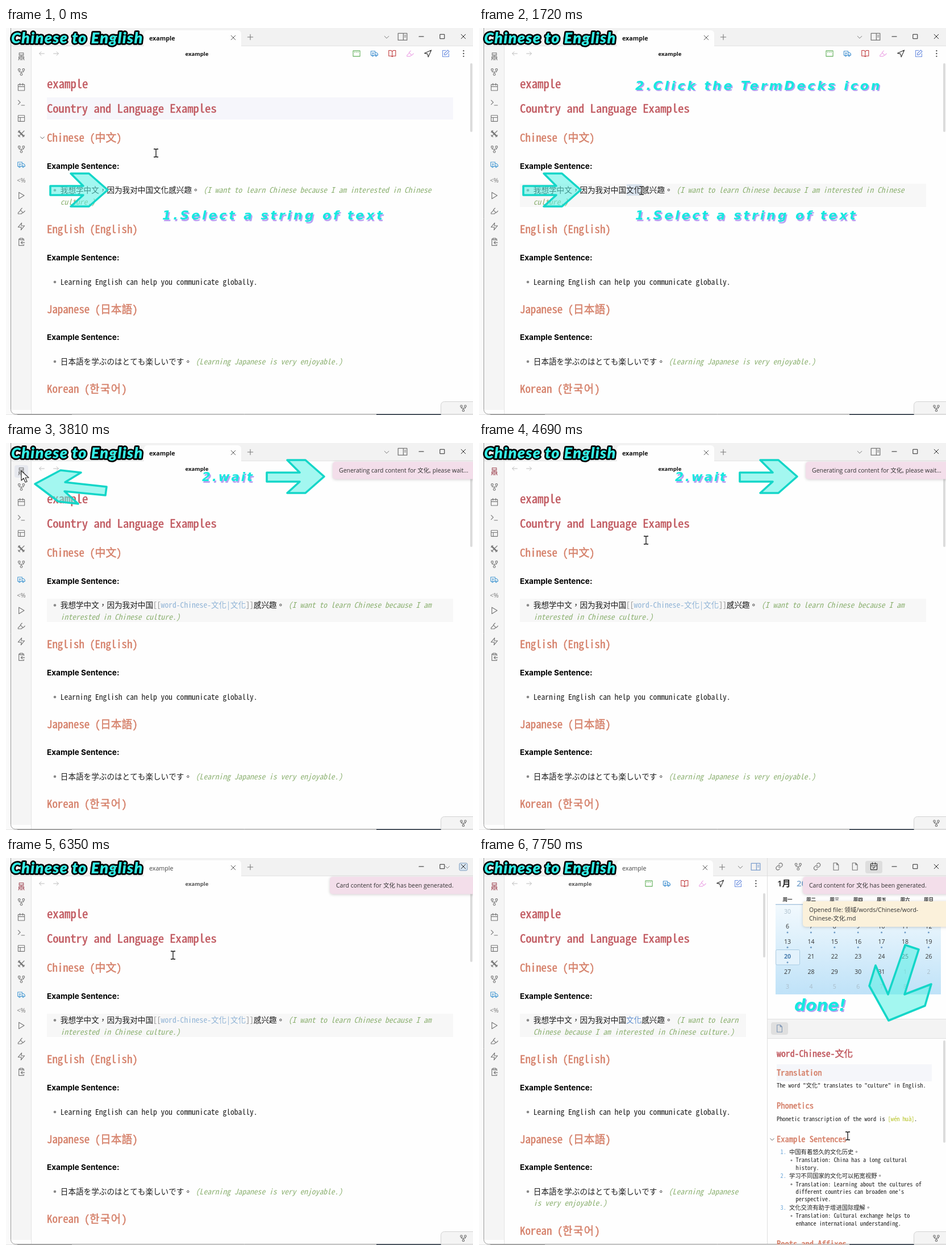
These frames come from a looping animation (822 by 681 pixels, 8000 ms). An HTML page with a canvas:

```html
<!DOCTYPE html>
<html lang="en">
<head>
<meta charset="utf-8">
<title>Word card demo</title>
<style>
html, body { margin: 0; width: 100%; height: 100%; overflow: hidden; background: #fff }
canvas { display: block }
</style>
</head>
<body>
<canvas id="stage" width="822" height="681"></canvas>
<script>
const c = document.getElementById('stage').getContext('2d');
const LOOP = 8000;
const MONO = '"Noto Sans Mono CJK TC", "Noto Sans Mono CJK SC", "Noto Sans Mono", "Noto Sans CJK TC", monospace';
const SANS = '"Open Sans", "Noto Sans CJK SC", sans-serif';
const RED = '#c0585f', ORANGE = '#d5806a', GREEN = '#8bb070', INK = '#1c1c1c', GREY = '#777';

// Icons on a 24 x 24 grid
const ring = (x, y, r) => `M${x + r} ${y}a${r} ${r} 0 1 1 ${-2 * r} 0a${r} ${r} 0 1 1 ${2 * r} 0`;
const box = 'M4 4h16a1 1 0 0 1 1 1v15a1 1 0 0 1-1 1H4a1 1 0 0 1-1-1V5a1 1 0 0 1 1-1z';
const ICONS = {
  bot: 'M6 2h12v7H6zM9 5.500h1M14 5.500h1M12 9v4M5 13h14v4H5zM7 17l-3 5M17 17l3 5M9 21h6',
  fork: ring(6, 6, 3) + ring(18, 6, 3) + ring(12, 19, 3) + 'M18 9v3H6V9M12 12v4',
  cal: box + 'M16 1v5M8 1v5M3 10h18',
  calCheck: box + 'M16 1v5M8 1v5M3 10h18M9 15l2 2 4-4',
  term: 'M3 17l6-6-6-6M12 19h9',
  layout: box + 'M3 10h18M9 10v11',
  tools: 'M4 4l16 16M20 4L4 20M3 8l5-5M16 21l5-5M3 16l5 5M5 4l14 14M19 5L5 19M4 6l14 14',
  truck: 'M14 17V5H2v12h3M9 17h6M14 9h4l4 4v4h-3M6 11h4M8 9v4' + ring(7, 18, 2) + ring(17, 18, 2),
  play: 'M5 3l15 9-15 9z',
  marker: 'M9 11l-6 6v3h9l3-3M22 12l-5 5-8-8 5-5',
  bolt: 'M13 2L3 14h9l-1 8 10-12h-9z',
  clip: 'M8 4H5v18h14v-3M16 4h3v5M8 2h8v4H8zM21 14H11M15 10l-4 4 4 4',
  card: 'M2 4h20v16H2zM6 8h1M11 8h1M16 8h1',
  book: 'M2 3h7l3 3 3-3h7v16h-7l-3 2-3-2H2zM12 6v15',
  send: 'M2 11L22 2l-9 20-2-9z',
  edit: 'M12 3H3v18h18v-9M18 2l4 4-10 10H8v-4z',
  dots: ring(12, 4, 1) + ring(12, 12, 1) + ring(12, 20, 1),
  file: 'M14 2H5v20h14V7zM14 2v5h5',
  panel: 'M1 4h22v17H1zM14 4v17M17 9h3M17 13h3',
  link: 'M10 13a5 5 0 0 0 7 .5l3-3a5 5 0 0 0-7-7l-2 2M14 11a5 5 0 0 0-7-.5l-3 3a5 5 0 0 0 7 7l2-2',
  down: 'M5 9l7 7 7-7', left: 'M20 12H4M10 6l-6 6 6 6', right: 'M4 12h16M14 6l6 6-6 6',
  plus: 'M12 4v16M4 12h16', close: 'M5 5l14 14M19 5L5 19', min: 'M5 12h14', max: 'M5 5h14v14H5z'
};
for (const k in ICONS) ICONS[k] = new Path2D(ICONS[k]);

function icon(name, x, y, color = GREY, size = 15) {
  c.save();
  c.translate(x - size / 2, y - size / 2);
  c.scale(size / 24, size / 24);
  c.strokeStyle = color;
  c.lineWidth = 1.8;
  c.lineJoin = c.lineCap = 'round';
  c.stroke(ICONS[name]);
  c.restore();
}

function rect(x, y, x2, y2, color, r = 0, line) {
  c.beginPath();
  c.roundRect(x, y, x2 - x, y2 - y, r);
  c.fillStyle = color;
  c.fill();
  if (line) { c.strokeStyle = line; c.lineWidth = 1; c.stroke(); }
}

function dot(x, y, r, color) {
  c.beginPath();
  c.arc(x, y, r, 0, 7);
  c.fillStyle = color;
  c.fill();
}

function text(s, x, y, size, color = INK, weight = 400, align = 'left', family = SANS) {
  c.font = `${weight} ${size}px ${family}`;
  c.textAlign = align;
  c.fillStyle = color;
  c.fillText(s, x, y);
  c.textAlign = 'left';
}

// Half-width Latin, full-width CJK; returns the end of the line
c.font = '100px ' + MONO;
const latin = Math.min(1, 50 / c.measureText('0').width);
function mono(s, x, y, size, color = INK, style = '', weight = 0) {
  c.fillStyle = c.strokeStyle = color;
  c.lineWidth = weight;
  for (const ch of s) {
    const wide = ch > '\u2e7f';
    c.font = `${style} ${wide ? size : size * latin}px ${MONO}`;
    c.fillText(ch, x, y);
    if (weight) c.strokeText(ch, x, y);
    x += wide ? size : size / 2;
  }
  return x;
}
const head = (s, x, y, size, color) => mono(s, x, y, size, color, '', .5);
const body = (s, x, y, color, style) => mono(s, x, y, 13.6, color, style);
const note = (s, y, x = 95.8) => body(s, x, y, GREEN, 'italic');
const small = (s, x, y, color) => mono(s, x, y, 10.3, color);

function neon(s, x, y, size = 22, spacing = 3.9) {
  c.letterSpacing = spacing + 'px';
  const font = 'italic bold';
  text(s, x + 2, y + 2.5, size, '#b7a2f2', font, 'left', '"DejaVu Sans", sans-serif');
  text(s, x, y, size, '#16e9df', font, 'left', '"DejaVu Sans", sans-serif');
  c.letterSpacing = '0px';
}

function arrow(points, dx = 0, dy = 0) {
  c.beginPath();
  for (const [x, y] of points) c.lineTo(x + dx, y + dy);
  c.closePath();
  c.fillStyle = 'rgba(90,242,230,.55)';
  c.strokeStyle = '#14d6c8';
  c.lineWidth = 3.6;
  c.lineJoin = 'round';
  c.fill();
  c.stroke();
}
const POINT_RIGHT = [[78, 278], [136, 278], [114, 256], [146, 256], [179, 285], [146, 314], [114, 314], [136, 294], [78, 294]];
const POINT_LEFT = [[51, 72], [96, 48], [132, 52], [104, 69], [177, 77], [175, 92], [103, 85], [127, 107], [92, 103]];
const POINT_DOWN = [[750, 153], [774, 161], [749, 240], [796, 222], [785, 260], [721, 286], [687, 225], [698, 189], [720, 240]];

// Pointer: [from ms, x, y]
const PATH = [[0, 264, 220], [340, 264, 285], [680, 261, 285], [1030, 284, 285], [1370, 285, 285],
  [1720, 286, 286], [2410, 281, 286], [2760, 245, 189], [3120, 36, 51], [3460, 27, 49], [4000, 33, 55],
  [4170, 110, 170], [4340, 240, 270], [4500, 290, 200], [4690, 294, 171], [7390, 560, 395], [7750, 649, 489]];

function pointer(t) {
  const [, x, y] = PATH.findLast(p => p[0] <= t);
  c.save();
  c.translate(x, y);
  c.lineJoin = 'round';
  if (x < 44) {
    const p = new Path2D('M0 0v17l4-4 3 7 3-1-3-7h6z');
    c.fillStyle = '#fff';
    c.strokeStyle = '#333';
    c.lineWidth = 1.2;
    c.fill(p);
    c.stroke(p);
  } else {
    const p = new Path2D('M-4-7h3l1 1 1-1h3M0-6v12M-4 7h3l1-1 1 1h3');
    c.strokeStyle = '#fff';
    c.lineWidth = 3;
    c.stroke(p);
    c.strokeStyle = '#111';
    c.lineWidth = 1.3;
    c.stroke(p);
  }
  c.restore();
}

function chrome(t, open) {
  const sliding = t >= 6190 && !open;
  rect(0, 0, 822, 681, '#fafafa');
  rect(8.5, -9, 830, 679.5, '#fefefe', 8, '#9c9c9c');
  rect(9, 0, 822, 32, '#f2f2f2');
  rect(9, 32, 44, 672, '#f5f5f5');
  rect(44, 32, 45, 679, '#e4e4e4');
  rect(9, 31, 822, 32, '#e2e2e2');
  rect(243, 4, open ? 412 : 414, 33, '#fefefe', [6, 6, 0, 0]);
  text('di', 147, 21, 10.5, '#999');
  const active = t < 6190;
  text('example', 252, 21.5, 10.7, active ? '#111' : '#444', active ? 700 : 400);
  icon('close', open ? 398 : 400, 17, '#555', 13);
  icon('plus', open ? 428 : 430, 16, GREY, 14);
  icon('min', 731, 15, '#222', 14);
  icon('max', 768, 15, '#222', 13);
  if (sliding) {
    icon('down', 777, 16, GREY, 12);
    rect(798, 9, 812, 22, '#d8e5f2', 2, '#7c9cbd');
  } else {
    icon('down', open ? 460 : 670, 16, GREY, 13);
    icon('panel', open ? 487 : 698, 15, open ? '#7d9fce' : GREY, 17);
  }
  icon('close', 805, 15, '#222', 13);

  if (t >= 3120 && t < 4170) rect(15, 39, 39, 61, '#e6e8ee', 4);
  const side = ['bot', 'fork', 'cal', 'term', 'layout', 'tools', 'fork', 'truck', '', 'play', 'marker', 'bolt', 'clip'];
  side.forEach((name, i) => {
    const y = 50 + i * 27.2;
    const color = i == 7 ? '#4a9bd4' : i == 0 && t >= 4170 ? '#a4505c' : GREY;
    if (name) icon(name, 27, y, color);
    else text('<%', 27, y + 4, 11, GREY, 400, 'center');
  });

  icon('left', 63, 45, '#bbb', 13);
  icon('right', 88, 45, '#bbb', 13);
  text('example', open ? 178 : 336, 49, 9.6, active ? '#111' : '#555', 700, 'center');
  const tools = { card: '#5fae57', truck: '#3f8fd0', book: '#c0393b', marker: '#eca6e6', send: '#333', edit: '#6d8fe0', dots: '#444' };
  Object.entries(tools).forEach(([name, color], i) =>
    icon(name, 617 + i * 31.4 - (open ? 318 : 0), 45, color, 14.5));
  rect(open ? 500 : 817, 62, open ? 504 : 821, open ? 175 : 183, '#dcdcdc', 2);
}

function article(t, open) {
  if (t < 340) rect(72, 122, 787, 161, '#f6f6fb');
  else rect(72, 274, open ? 470 : 787, 315, '#f7f7f7');
  if (t >= 1030 && t < 3460) rect(260, 275, 287, 295, '#d9e3ee');
  if (t < 340 || t >= 2760 && t < 3120) icon('down', 64, 193, '#444', 11);

  head('example', 72, 106, 20.7, RED);
  head('Country and Language Examples', 72, 149, 20.6, RED);
  const shift = open ? 20.5 : 0;
  head('Chinese (中文)', 72, 200, 18.8, ORANGE);
  head('English (English)', 72, 361, 18.8, ORANGE);
  head('Japanese (日本語)', 72, 502, 18.8, ORANGE);
  head('Korean (한국어)', 72, 642 + shift, 18.8, ORANGE);
  for (const y of [248, 409, 549]) text('Example Sentence:', 72, y, 13.6, '#000', 700, 'left', 'Inter, sans-serif');
  for (const y of [285.5, 447, 587]) dot(86, y, 2.3, '#888');

  let x = body('我想学中文，因为我对中国', 95.8, 290);
  let lines = ['(I want to learn Chinese because I am interested in Chinese', 'culture.)'];
  if (open) {
    x = body('文化', x, 290, '#5f8fd0');
    lines = ['(I want to learn', 'Chinese because I am interested in Chinese culture.)'];
  } else if (t >= 3460) {
    x = body('[[', x, 290, '#888');
    x = body('word-Chinese-文化|文化', x, 290, '#8fb3d6');
    x = body(']]', x, 290, '#888');
    lines = ['(I want to learn Chinese because I am', 'interested in Chinese culture.)'];
  } else x = body('文化', x, 290);
  x = body('感兴趣。 ', x, 290);
  note(lines[0], 290, x);
  note(lines[1], 310.5);

  body('Learning English can help you communicate globally.', 95.8, 451.5);
  x = body('日本語を学ぶのはとても楽しいです。 ', 95.8, 592);
  note(open ? '(Learning Japanese' : '(Learning Japanese is very enjoyable.)', 592, x);
  if (open) note('is very enjoyable.)', 612);
}

function calendar() {
  const g = c.createLinearGradient(0, 70, 0, 240);
  g.addColorStop(0, '#f6fbfe');
  g.addColorStop(1, '#bfe2f8');
  rect(522, 83, 813, 240, g);
  rect(522, 81, 813, 82.5, '#a9c6df');
  text('1月', 525, 50, 15, '#222', 600);
  text('2025', 559, 50, 15, '#7ba5cf', 600);
  rect(522.5, 161.5, 564.5, 188, '#e3f2fc', 2, '#a9cbe2');
  for (let col = 0; col < 7; col++) {
    const x = 543 + col * 41.4;
    text('周' + '一二三四五六日'[col], x, 76, 8.5, '#333', 600, 'center');
    for (let row = 0; row < 6; row++) {
      const n = row * 7 + col - 1, y = 98 + row * 26.4;
      const inside = n > 0 && n < 32;
      text(n < 1 ? n + 31 : inside ? n : n - 31, x, y, 10.5, n == 20 ? '#4b7fb0' : inside ? '#333' : '#a9bcc9', n == 20 ? 700 : 400, 'center');
      if (inside && n > 5 && n < 21) dot(x, y + 6.5, 1.5, '#6d9bc6');
    }
  }
}

function card(t) {
  rect(508, 284, 822, 318, '#f3f3f3');
  rect(508, 283, 822, 284, '#e0e0e0');
  rect(508, 317, 822, 318, '#e0e0e0');
  rect(514, 289, 544, 311, '#dfdfdf', 4);
  if (t >= 7040) icon('file', 529, 300, '#7f97b5');
  if (t >= 7390) rect(524, 363, 797, 393, '#f5f6fa');
  if (t >= 7750) icon('down', 516, 495, '#444', 11);
  rect(817, 321, 821, 501, '#dcdcdc', 2);

  head('word-Chinese-文化', 524, 349.5, 15.75, RED);
  const titles = { 383: 'Translation', 441: 'Phonetics', 500: 'Example Sentences', 684: 'Roots and Affixes' };
  for (const y in titles) head(titles[y], 524, +y, 14.45, ORANGE);
  small('The word "文化" translates to "culture" in English.', 524, 403.5);
  let x = small('Phonetic transcription of the word is ', 524, 462.5);
  x = small('[wén huà]', x, 462.5, '#b4c01c');
  small('.', x, 462.5);

  let y = 521;
  [['中国有着悠久的文化历史。', 'Translation: China has a long cultural', 'history.'],
    ['学习不同国家的文化可以拓宽视野。', 'Translation: Learning about the cultures of', 'different countries can broaden one\'s', 'perspective.'],
    ['文化交流有助于增进国际理解。', 'Translation: Cultural exchange helps to', 'enhance international understanding.']
  ].forEach(([first, ...rest], i) => {
    small(i + 1 + '.', 530.5, y, '#6aa5d8');
    small(first, 546, y);
    dot(550, y + 11, 1.6, '#888');
    rest.forEach((line, k) => small(line, 557.5, y + 14.4 + k * 13.4));
    y += 28.8 + 13.4 * (rest.length - 1);
  });
}

function sidebar(t) {
  rect(508, 32, 822, 679, '#fefefe');
  rect(507, 0, 508, 679, '#dedede');
  rect(680, 5, 710, 27, '#dedede', 4);
  ['link', 'fork', 'link', 'file', 'file', 'calCheck'].forEach((name, i) =>
    icon(name, 528.5 + i * 33.3, 15, i == 5 ? '#333' : GREY));
  calendar();
  card(t);
}

function notice(x, y, y2, color, lines) {
  c.save();
  c.shadowColor = 'rgba(0,0,0,.18)';
  c.shadowBlur = 5;
  c.shadowOffsetY = 1;
  rect(x, y, 830, y2, color, 5);
  c.restore();
  lines.forEach((s, i) => text(s, x + 11, y + 19 + i * 14.5, 10.5, '#333'));
}

function footer() {
  rect(0, 680, 822, 681, '#e6e6e6');
  rect(20, 680, 116, 681, '#a5a5a5');
  rect(652, 679, 766, 681, '#4c5560');
  rect(765.5, 657.5, 830, 679.5, '#f4f4f4', [6, 0, 0, 0], '#d2d2d2');
  icon('fork', 805, 669, '#666', 14);
}

function draw(t) {
  const open = t >= 6710;
  chrome(t, open);
  article(t, open);
  if (open) sidebar(t);
  footer();

  if (t >= 3460 && t < 5750) {
    c.globalAlpha = Math.min(1, (5750 - t) / 720);
    notice(575, 33, 63.5, '#f3deea', ['Generating card content for 文化, please wait...']);
    c.globalAlpha = 1;
  }
  if (t >= 6190) notice(570, 33, 63.5, '#f3deea', ['Card content for 文化 has been generated.']);
  if (open) notice(570, 76, 121, '#fbf1db', ['Opened file: 领域/words/Chinese/word-', 'Chinese-文化.md']);

  if (t < 3120) {
    arrow(POINT_RIGHT);
    neon('1.Select a string of text', 275, 337);
  }
  if (t >= 1720 && t < 3460) neon('2.Click the TermDecks icon', 275, 108.5);
  if (t >= 2410 && t < 4340) arrow(POINT_LEFT);
  if (t >= 3460 && t < 6190) {
    neon('2.wait', 345, 67, 21.5, 2.8);
    arrow(POINT_RIGHT, 381, -226);
  }
  if (open) {
    neon('done!', 555, 268.5, 28, 0);
    arrow(POINT_DOWN);
  }

  const title = ['Chinese to English', 9, 27];
  c.font = 'italic 900 27px Lato, sans-serif';
  c.letterSpacing = '1.3px';
  c.lineJoin = 'round';
  c.lineWidth = 5.5;
  c.strokeStyle = '#000';
  c.strokeText(...title);
  c.fillStyle = '#35f2e8';
  c.fillText(...title);
  c.letterSpacing = '0px';
  pointer(t);
}

function frame() {
  draw(performance.now() % LOOP);
  requestAnimationFrame(frame);
}
frame();
</script>
</body>
</html>
```
